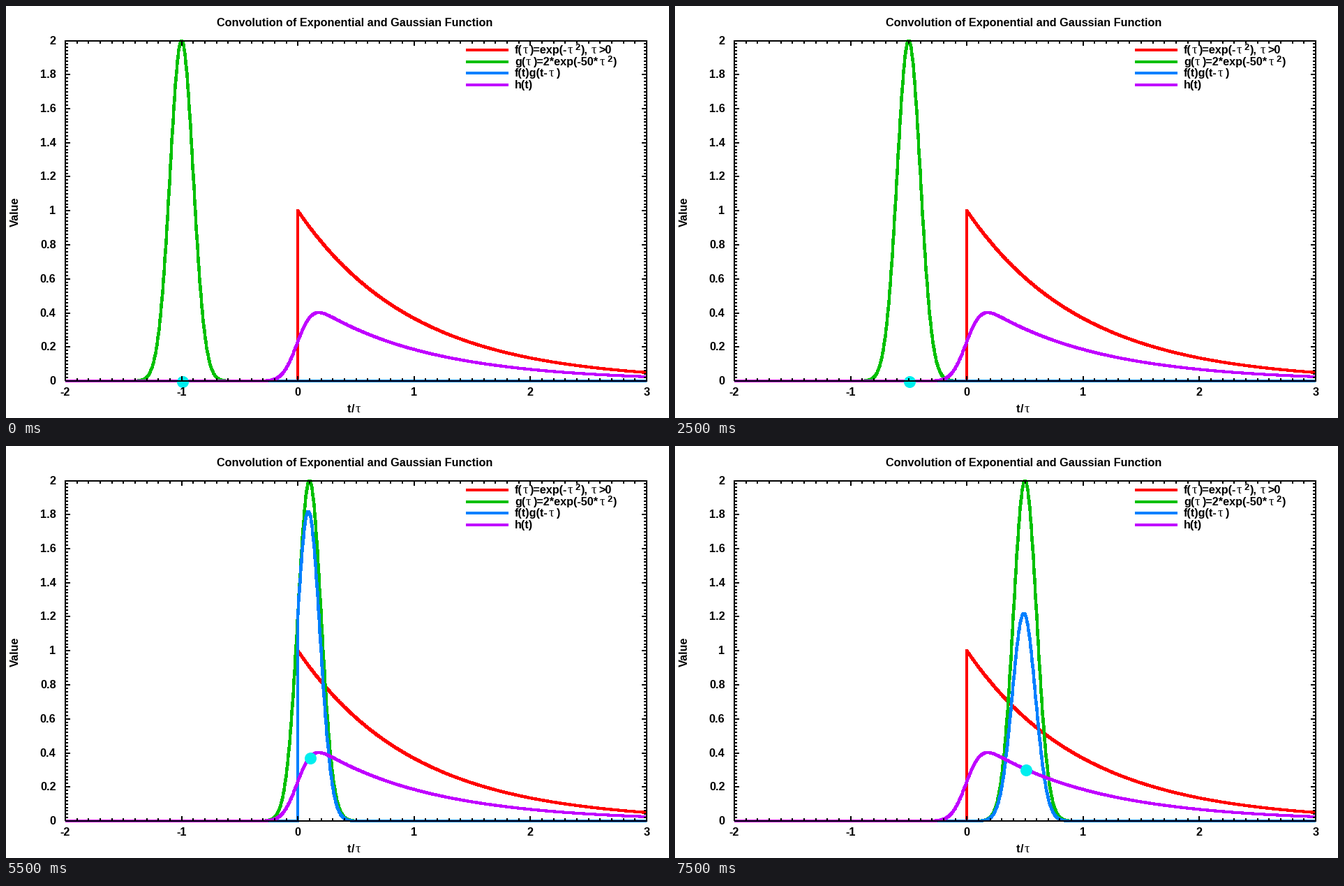
Animation of 950 by 590 pixels, one loop 8000 ms. Source, as a matplotlib script:

```python
import math

import matplotlib.pyplot as plt
import numpy as np
from matplotlib.animation import FuncAnimation

W, H, DPI = 950, 590, 100
PX = 72 / DPI  # points per pixel
LEFT, RIGHT, TOP, BOTTOM = 85, 918, 49.5, 537
FRAMES, INTERVAL = 16, 500
EM = 16.3
RED, GREEN, BLUE, PURPLE, CYAN = "#ff0000", "#00c000", "#0080ff", "#c000ff", "#00eeee"

plt.rcParams["path.simplify"] = False
fig = plt.figure(figsize=(W / DPI, H / DPI), dpi=DPI, facecolor="white")
ax = fig.add_axes([0, 0, 1, 1])
ax.set_xlim(0, W)
ax.set_ylim(H, 0)
ax.axis("off")


def sx(x):
    """Data x to whole pixels, as a plain raster plotter does."""
    return np.round(LEFT + (x + 2) / 5 * (RIGHT - LEFT))


def sy(y):
    return np.round(BOTTOM - y / 2 * (BOTTOM - TOP))


def f(x):
    return np.where(x >= 0, np.exp(-x), 0)


def g(x):
    return 2 * np.exp(-50 * x**2)


def h(t):
    """Closed form of the convolution of f and g."""
    phi = 0.5 * (1 + math.erf((t - 0.01) / 0.1 / math.sqrt(2)))
    return 0.2 * math.sqrt(2 * math.pi) * math.exp(0.005 - t) * phi


def stroke(x, y, color, width=4, z=2):
    return ax.plot(x, y, color=color, lw=width * PX, zorder=z, antialiased=False,
                   solid_capstyle="butt", solid_joinstyle="round")[0]


def label(x, y, s, size=EM, ha="left", **kw):
    kw = {"family": "Liberation Sans", "weight": "bold", "va": "baseline", **kw}
    ax.text(x, y, s, fontsize=size * PX, ha=ha, zorder=6, **kw)


def formula(x, y, parts):
    """Write (offset, text) parts; 'τ' and '^2' get their own style."""
    for dx, s in parts:
        if s == "τ":
            label(x + dx + 0.5, y, s, 18.5, family="Liberation Serif", weight="normal")
        elif s == "^2":
            label(x + dx, y - 5, "2", 13)
        else:
            label(x + dx, y, s)


def tick(x, y, dx, dy):
    stroke([x, x + dx], [y, y + dy], "black", 2, 5)


# Frame and ticks
stroke([LEFT, RIGHT, RIGHT, LEFT, LEFT], [BOTTOM, BOTTOM, TOP, TOP, BOTTOM],
       "black", 2, 5).set_solid_joinstyle("miter")
for i in range(51):
    x, size = sx(-2 + i / 10), 7 if i % 10 == 0 else 4
    tick(x, BOTTOM, 0, -size)
    tick(x, TOP, 0, size)
    if i % 10 == 0:
        label(x, 558, str(i // 10 - 2), ha="center")
for i in range(101):
    y, size = sy(i / 50), 7 if i % 10 == 0 else 4
    tick(LEFT, y, size, 0)
    tick(RIGHT, y, -size, 0)
    if i % 10 == 0:
        label(71.5, y + 5, f"{i / 50:g}", ha="right")

# Titles
label(500, 29, "Convolution of Exponential and Gaussian Function", ha="center")
label(13, 295, "Value", ha="center", va="center", rotation=90)
formula(489, 582, [(0, "t"), (6, "/"), (11.5, "τ")])

# Legend
legend = [
    (RED, [(0, "f("), (10.9, "τ"), (21.5, ")=exp(-"), (75.5, "τ"),
           (86, "^2"), (94, "),"), (109, "τ"), (120, ">0")]),
    (GREEN, [(0, "g("), (15.4, "τ"), (26, ")=2*exp(-50*"), (121, "τ"),
             (132, "^2"), (140.5, ")")]),
    (BLUE, [(0, "f(t)g(t-"), (48, "τ"), (59, ")")]),
    (PURPLE, [(0, "h(t)")]),
]
for i, (color, parts) in enumerate(legend):
    y = 63 + 33 * i // 2 + i % 2
    stroke([659, 720], [y, y], color)
    formula(729, y + 5, parts)

# Curves
xs = np.linspace(-2, 3, 2001)
px = sx(xs)
stroke(px, sy(f(xs)), RED)
bell = stroke(px, sy(g(xs + 1)), GREEN)
product = stroke(px, sy(f(xs) * g(xs + 1)), BLUE)
stroke(px, sy(np.array([h(x) for x in xs])), PURPLE, z=3)
dot, = ax.plot([], [], "o", color=CYAN, ms=17 * PX, mew=0, zorder=4,
               antialiased=False)


def update(i):
    t = -1 + i / 10
    kernel = g(xs - t)
    bell.set_ydata(sy(kernel))
    product.set_ydata(sy(f(xs) * kernel))
    dot.set_data([sx(t) + 0.5], [sy(h(t)) + 0.5])
    return bell, product, dot


anim = FuncAnimation(fig, update, frames=FRAMES, interval=INTERVAL,
                     repeat=True, repeat_delay=0)
plt.show()
```
